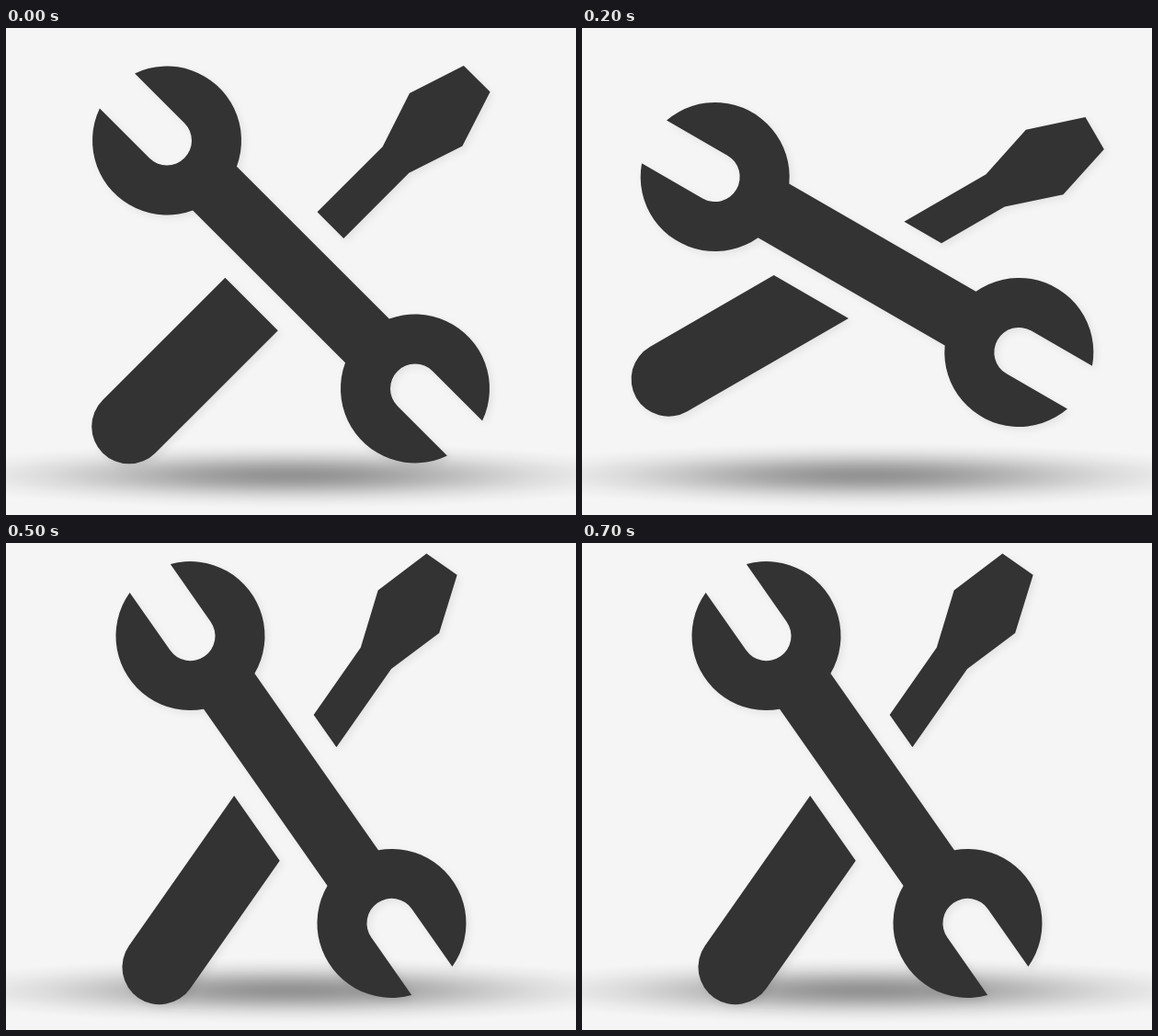
An HTML page with a canvas for the animation above (800 ms loop, 620 by 530 pixels).

```html
<!DOCTYPE html>
<html lang="en">
<head>
<meta charset="utf-8">
<title>Tools</title>
<style>
  html, body { margin: 0; width: 100%; height: 100%; overflow: hidden; background: #f5f5f5; }
  canvas { display: block; }
</style>
</head>
<body>
<canvas id="stage" width="620" height="530"></canvas>
<script>
const ctx = document.getElementById('stage').getContext('2d');
const RAD = Math.PI / 180;
const CX = 310, CY = 257.5;
const STEP = 100;
const SWING = [0, 10, 15, 10, 0, -10, -15, -10];

// wrench: head distance, head radius, half slot, half shaft
const HEAD = 190.9, R = 81, SLOT = 27, SHAFT = 33.8;
// screwdriver: half widths, positions along its axis, gap around the wrench
const WIDE = 40.6, THIN = 20.3;
const END = -249.2, NECK = 161.2, BLADE = 223, TIP = 286, GAP = 60.7;

function drawFloor() {
  const g = ctx.createRadialGradient(0, 0, 0, 0, 0, 1);
  const bell = r => Math.exp(-r * r / 0.353);
  for (let i = 0; i <= 20; i++) {
    const r = i / 20;
    const a = 0.4 * (bell(r) - bell(1)) / (1 - bell(1));
    g.addColorStop(r, `rgba(0,0,0,${a.toFixed(4)})`);
  }
  ctx.save();
  ctx.translate(CX, 487);
  ctx.scale(410, 36);
  ctx.fillStyle = g;
  ctx.fillRect(-1, -1, 2, 2);
  ctx.restore();
}

function wrenchPath() {
  const jaw = Math.asin(SLOT / R), neck = Math.asin(SHAFT / R);
  for (let side = 0; side < 2; side++) {
    ctx.arc(HEAD, 0, R, Math.PI + neck, 2 * Math.PI - jaw);
    ctx.lineTo(HEAD, -SLOT);
    ctx.arc(HEAD, 0, SLOT, -Math.PI / 2, Math.PI / 2, true);
    ctx.arc(HEAD, 0, R, jaw, Math.PI - neck);
    ctx.rotate(Math.PI);
  }
  ctx.closePath();
}

function driverPath(swing) {
  // both cut faces stay parallel to the wrench
  const cut = (side, y) => (side * GAP + y * Math.sin(2 * swing)) / Math.cos(2 * swing);
  ctx.moveTo(cut(-1, WIDE), WIDE);
  ctx.arc(END, 0, WIDE, Math.PI / 2, Math.PI * 1.5);
  ctx.lineTo(cut(-1, -WIDE), -WIDE);
  ctx.closePath();

  ctx.moveTo(cut(1, -THIN), -THIN);
  ctx.lineTo(NECK, -THIN);
  ctx.lineTo(BLADE, -WIDE);
  ctx.lineTo(TIP, -THIN);
  ctx.lineTo(TIP, THIN);
  ctx.lineTo(BLADE, WIDE);
  ctx.lineTo(NECK, THIN);
  ctx.lineTo(cut(1, THIN), THIN);
  ctx.closePath();
}

function fillTurned(angle, path) {
  ctx.save();
  ctx.translate(CX, CY);
  ctx.rotate(angle);
  ctx.beginPath();
  path();
  ctx.fill();
  ctx.restore();
}

function draw(swing) {
  ctx.fillStyle = '#f5f5f5';
  ctx.fillRect(0, 0, 620, 530);
  drawFloor();

  ctx.save();
  ctx.fillStyle = '#333';
  ctx.shadowColor = 'rgba(0,0,0,0.08)';
  ctx.shadowBlur = 8;
  ctx.shadowOffsetX = ctx.shadowOffsetY = 3;
  const tilt = 45 * RAD - swing;
  fillTurned(-tilt, () => driverPath(swing));
  fillTurned(tilt, wrenchPath);
  ctx.restore();
}

const start = performance.now();
function tick() {
  const step = Math.floor((performance.now() - start) / STEP) % SWING.length;
  draw(SWING[step] * RAD);
  requestAnimationFrame(tick);
}
tick();
</script>
</body>
</html>
```
